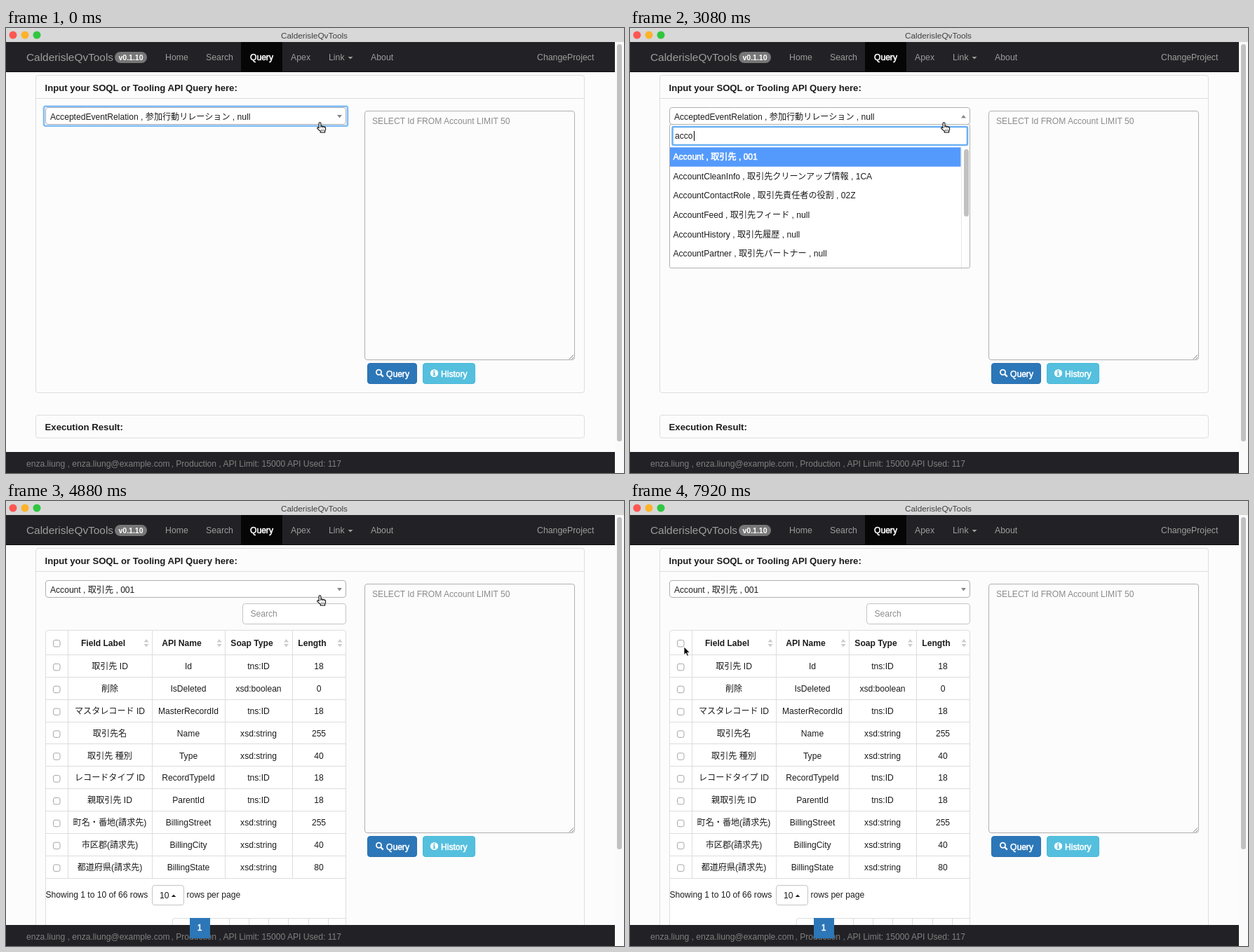
An HTML page that plays this animation: 881 px wide and 635 px high, repeating every 8000 ms.

```html
<!DOCTYPE html>
<html lang="en">
<head>
<meta charset="utf-8">
<title>Query tool</title>
<style>
html, body { margin: 0; width: 881px; height: 635px; overflow: hidden; background: #fcfcfc; }
svg { display: block; font: 12.1px "Liberation Sans", "Noto Sans CJK JP", "Noto Sans CJK", sans-serif; }
</style>
</head>
<body>
<svg id="stage" width="881" height="635" lang="ja"></svg>
<script>
const LOOP = 8000;
const INK = '#1c1c1c', LINE = '#ddd', GREY = '#b0b0b0', THUMB = '#c1c1c1';
const BOLD = 'font-weight="bold"';
const MIDDLE = 'text-anchor="middle"';
const MEDIUM = 'stroke="#fff" stroke-width=".55"';

const box = (x, y, w, h, fill, stroke = 'none', rx = 0, more = '') =>
  `<rect x="${x}" y="${y}" width="${w}" height="${h}" fill="${fill}" stroke="${stroke}" rx="${rx}" ${more}/>`;
const text = (x, y, s, fill = INK, more = '') => `<text x="${x}" y="${y}" fill="${fill}" ${more}>${s}</text>`;
const path = (d, fill, stroke = 'none', more = '') => `<path d="${d}" fill="${fill}" stroke="${stroke}" ${more}/>`;
const circle = (x, y, r, fill, more = '') => `<circle cx="${x}" cy="${y}" r="${r}" fill="${fill}" ${more}/>`;
const triangle = (x, y, w, h, fill) => path(`M${x - w / 2} ${y}h${w}l${-w / 2} ${h}z`, fill);

// Latest entry [time, ...values] that has started
const at = (list, ms) => list.findLast(e => e[0] <= ms);

const objects = ['AcceptedEventRelation , 参加行動リレーション , null', 'Account , 取引先 , 001',
  'AccountCleanInfo , 取引先クリーンアップ情報 , 1CA', 'AccountContactRole , 取引先責任者の役割 , 02Z',
  'AccountFeed , 取引先フィード , null', 'AccountHistory , 取引先履歴 , null',
  'AccountPartner , 取引先パートナー , null'];

const fields = [['取引先 ID', 'Id', 'tns:ID', 18], ['削除', 'IsDeleted', 'xsd:boolean', 0],
  ['マスタレコード ID', 'MasterRecordId', 'tns:ID', 18], ['取引先名', 'Name', 'xsd:string', 255],
  ['取引先 種別', 'Type', 'xsd:string', 40], ['レコードタイプ ID', 'RecordTypeId', 'tns:ID', 18],
  ['親取引先 ID', 'ParentId', 'tns:ID', 18], ['町名・番地(請求先)', 'BillingStreet', 'xsd:string', 255],
  ['市区郡(請求先)', 'BillingCity', 'xsd:string', 40], ['都道府県(請求先)', 'BillingState', 'xsd:string', 80]];

// time, typed text, caret x (0 = hidden), scroll thumb height
const typing = [[150, '', 64.5, 15], [540, '', 0, 15], [1130, '', 64.5, 15], [1280, 'a', 71.5, 15],
  [1730, 'ac', 77.5, 15], [2180, 'ac', 0, 15], [2630, 'acc', 83.5, 64], [3080, 'acco', 91.5, 96],
  [3230, 'accou', 98, 96], [3380, 'accoun', 105, 96], [3530, 'account', 108.5, 96],
  [3980, 'account', 0, 96], [4580, 'account', 108.5, 96]];

// time, pointer tip x, y
const pointer = [[0, 447.5, 135], [5630, 420, 141], [5780, 372, 153], [5930, 300, 173], [6150, 215, 194],
  [6300, 156, 203], [6450, 98, 206], [6600, 60, 210], [6740, 76, 207], [6890, 142, 204], [7040, 245, 192],
  [7190, 352, 165], [7330, 335, 182], [7480, 250, 205], [7630, 155, 214], [7780, 92, 217], [7920, 77, 208]];

function header() {
  const nav = [[227, 'Home'], [285, 'Search'], [406, 'Apex'], [460, 'Link'], [520, 'About'], [757, 'ChangeProject']];
  return box(0, 0, 881, 20, '#d8d8d8') +
    circle(10, 10, 5.5, '#fc5753') + circle(27, 10, 5.5, '#fdb32b') + circle(44, 10, 5.5, '#30c740') +
    text(439.5, 14.5, 'CalderisleQvTools', '#404040', MIDDLE + ' font-size="11.8"') +
    box(0, 20, 868, 43, '#222226') + box(0, 62, 868, 1, '#0a0a0a') + box(335, 20, 59, 43, '#060606') +
    text(29, 46.5, 'CalderisleQvTools', '#9d9d9d', 'font-size="15.4"') +
    box(155, 34, 46, 16, '#777', 'none', 8) +
    text(178, 45.8, 'v0.1.10', '#fff', `${BOLD} ${MIDDLE} font-size="10.5"`) +
    nav.map(([x, s]) => text(x, 46, s, '#9d9d9d', 'font-size="12.3"')).join('') +
    text(348, 46, 'Query', '#fff', MEDIUM) + triangle(491, 41, 7, 3.5, '#9d9d9d');
}

function queryPane() {
  return text(55.5, 89.5, 'Input your SOQL or Tooling API Query here:', INK, BOLD + ' font-size="13.15"') +
    box(511.5, 118.5, 299, 355, 'none', GREY, 3.5) +
    path('M803 472.5l6-6M806.5 472.5l2.5-2.5', 'none', '#777') +
    text(522, 137, 'SELECT Id FROM Account LIMIT 50', '#8c8c8c') +
    box(515.5, 478.5, 70, 29, '#2c77b8', '#2a70ae', 3.5) +
    circle(531.5, 491.3, 3.6, 'none', 'stroke="#fff" stroke-width="1.8"') +
    path('M534.2 494l3.6 3.6', 'none', '#fff', 'stroke-width="2.2"') +
    text(542, 497.5, 'Query', '#fff', MEDIUM) +
    box(594.5, 478.5, 74, 29, '#55bfde', '#48b8d9', 3.5) + circle(610.5, 492.5, 5.6, '#fff') +
    path('M609.3 488.4h2.2v1.8h-2.2zM608.6 491.3h2.9v3.6h1v1.2h-4v-1.2h1v-2.4h-.9z', '#55bfde') +
    text(620, 497.5, 'History', '#fff', MEDIUM);
}

function select(label, up) {
  return box(56.5, 113.5, 428, 24, '#fff', GREY, 3.5) + text(63, 131, label) +
    triangle(475.5, up ? 128.5 : 124, 7, up ? -4.5 : 4.5, '#888');
}

function dropdown(ms) {
  const [, typed, caret, thumb] = at(typing, ms);
  const first = ms < 3080 ? 0 : 1;
  const active = ms >= 4280 && ms < 4430 ? 1 : 0;
  const rows = objects.slice(first, first + 6).map((s, i) => {
    const y = 170.3 + i * 27.55, on = i === active;
    return (on ? box(57, y, 414.5, 27.5, '#549afc') : '') +
      text(61.5, y + 18, s, on ? '#fff' : INK, on ? MEDIUM : '');
  });
  return select(objects[0], true) + box(56.5, 137.5, 428, 205, '#fff', GREY, 2) +
    box(60.5, 141, 420.5, 26, '#fff', '#6cb1f4', 2, 'stroke-width="2.6"') +
    text(64, 158, typed) + (caret ? box(caret - .5, 147, 1, 14, '#000') : '') +
    rows.join('') + box(472, 170, 1, 172, '#e8e8e8') + box(476, 173, 7, thumb, THUMB, 'none', 3.5);
}

function table() {
  const edges = [56.5, 88.5, 208.5, 312.5, 408.5, 484.5];
  const heads = [[138.5, 'Field Label', 200], [250.5, 'API Name', 304], [350.5, 'Soap Type', 399.5], [436.5, 'Length', 476]];
  const centers = [148, 260, 360, 446];
  const rowY = i => 219.5 + i * 31.85;
  const check = y => box(67.5, y - 4.5, 9.5, 9.5, '#fff', '#a6a6a6', 2.5);
  let s = select(objects[1], false) + box(337.5, 146.5, 147, 29, '#fff', '#c4c4c4', 3.5) +
    text(348.5, 165, 'Search', '#8c8c8c') +
    path('M56.5 606V188q0-3.5 3.5-3.5H481q3.5 0 3.5 3.5V606', '#fff', LINE);
  s += edges.slice(1, 5).map(x => path(`M${x} 184.5V${rowY(10)}`, 'none', LINE)).join('') + check(203);
  s += heads.map(([x, label, icon]) => text(x, 206.5, label, INK, `${BOLD} ${MIDDLE}`) +
    triangle(icon, 201.5, 7, -4.5, '#ccc') + triangle(icon, 204, 7, 4.5, '#ccc')).join('');
  for (let i = 0; i <= 10; i++) s += path(`M56.5 ${Math.round(rowY(i) - .5) + .5}H484.5`, 'none', LINE);
  fields.forEach((row, i) => {
    s += check(rowY(i) + 17.3) + row.map((v, c) => text(centers[c], rowY(i) + 20.7, v, INK, MIDDLE)).join('');
  });
  s += text(56.5, 566, 'Showing 1 to 10 of 66 rows') + box(208.5, 548.5, 45, 28, '#fff', '#c4c4c4', 3.5) +
    text(219, 567, '10') + triangle(239, 565, 6.5, -3.5, INK) + text(257.5, 566, 'rows per page');
  s += path('M237.5 606V598q0-2.5 2.5-2.5H484.5', 'none', LINE);
  return s + [318.5, 346.5, 374.5, 402.5, 431.5, 459.5].map(x => path(`M${x} 595.5V606`, 'none', LINE)).join('');
}

function cursor(ms) {
  const [, x, y] = at(pointer, ms);
  const hand = ms < 5630 || (x > 88 && y > 184 && y < 219);
  const shape = hand
    ? path('M-1.5 8V1.2a1.5 1.5 0 0 1 3 0V5.5q1.4-.9 2.6.3q1.4-.6 2.4.6q2-.3 2 1.5V10.5L7.5 13v1.8H.8V13L-3.8 9q-.6-2 1-1.8z',
      '#fff', '#000', 'stroke-width="1.1"') + path('M1.5 5.5V8M4.1 6V8.3M6.5 6.6V8.5M2 10.3v2.5M4 10.3v2.5M6 10.3v2.5', 'none', '#000', 'stroke-width=".7"')
    : path('M0 0V11.6L2.7 9.1 4.5 13.3 6.5 12.4 4.7 8.3H8.3Z', '#000', '#fff', 'stroke-width=".9"');
  return `<g transform="translate(${x} ${y}) scale(${hand ? .95 : 1})">${shape}</g>`;
}

function scene(ms) {
  const loaded = ms >= 4880;
  let s = box(0, 0, 881, 635, '#fcfcfc') + box(42.5, 67.5, 782, loaded ? 600 : 453, 'none', LINE, 3.5) +
    path('M42.5 100.5H824.5', 'none', LINE) + queryPane() + header();
  if (!loaded) {
    s += box(42.5, 552.5, 782, 32.5, 'none', LINE, 3.5) +
      text(55.5, 574, 'Execution Result:', INK, BOLD + ' font-size="13.2"');
  }
  if (ms < 150) s += box(54, 111.8, 433, 28, '#fff', '#83bdf6', 2.5, 'stroke-width="2.6"') + select(objects[0], false);
  else s += loaded ? table() : dropdown(ms);
  s += box(0, 605, 868, 30, '#222226') +
    text(29, 626, 'enza.liung , enza.liung@example.com', '#808080') +
    text(235.5, 626, ', Production , API Limit: 15000 API Used: 117', '#808080');
  if (loaded) s += box(262, 595, 29, 29, '#2c77b8') + text(276, 613, '1', '#fff', `${MIDDLE} ${MEDIUM}`);
  s += box(868, 20, 13, 615, '#fafafa') + box(871, 23, 7, loaded ? 474 : 567, THUMB, 'none', 3.5);
  return s + cursor(ms);
}

const stage = document.getElementById('stage');
const start = performance.now();
let shown = '';
function tick() {
  const next = scene((performance.now() - start) % LOOP);
  if (next !== shown) stage.innerHTML = shown = next;
  requestAnimationFrame(tick);
}
tick();
</script>
</body>
</html>
```
